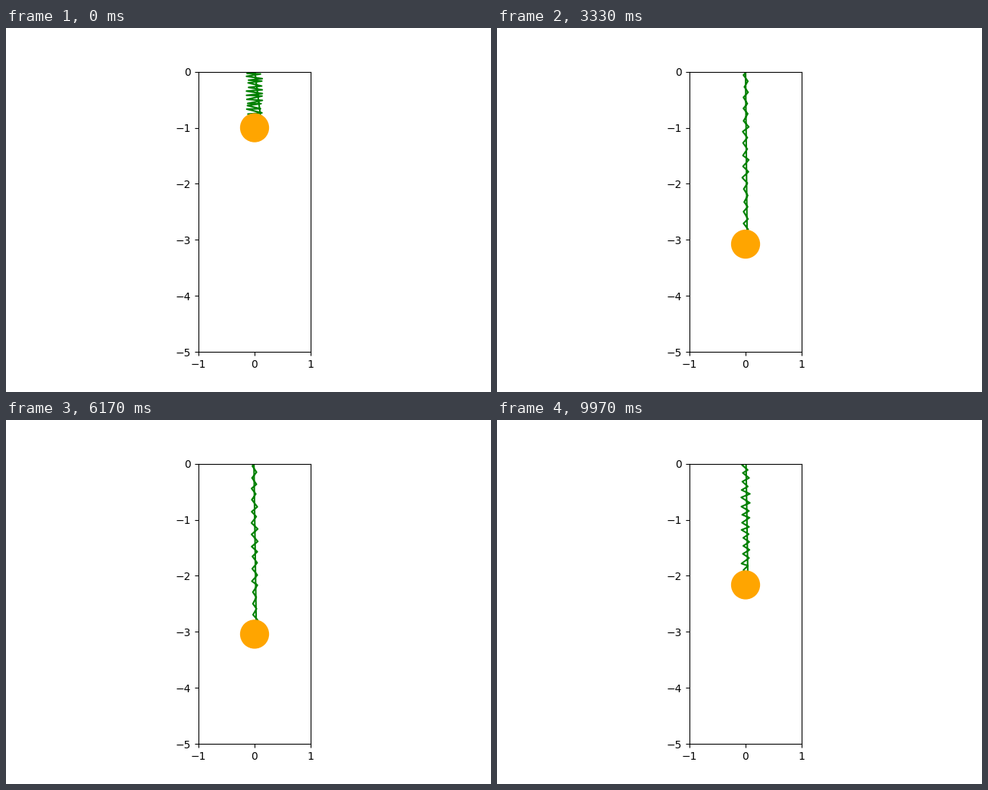
These frames come from a looping animation (640 by 480 pixels, 10000 ms). A matplotlib script:

```python
import numpy as np
import matplotlib.pyplot as plt
from matplotlib.animation import FuncAnimation

FRAMES = 300
LOOP_MS = 10000

# Damped mass on a spring, released at rest
MASS, STIFFNESS, DAMPING = 1.0, 20.0, 0.25
GRAVITY, REST_LENGTH, START_LENGTH = 9.81, 2.0, 1.0

HALF_TURNS = 30
COIL_WIDTH = 0.125
JITTER = 0.02

TIMES = np.linspace(0, 10, FRAMES)


def spring_length(t):
    mean = REST_LENGTH + MASS * GRAVITY / STIFFNESS
    decay = DAMPING / (2 * MASS)
    omega = np.sqrt(STIFFNESS / MASS - decay ** 2)
    swing = np.cos(omega * t) + decay / omega * np.sin(omega * t)
    return mean + (START_LENGTH - mean) * np.exp(-decay * t) * swing


def coil(length, seed):
    """Shaky zigzag from the support down to the ball, closed to its start."""
    rng = np.random.default_rng(seed)
    k = np.arange(HALF_TURNS)
    x = np.append(0, COIL_WIDTH / length * np.where(k % 2, 1, -1))
    y = np.append(0, -length * (k + 0.5) / HALF_TURNS)
    x += rng.uniform(-JITTER, JITTER, x.size)
    y += rng.uniform(-JITTER, JITTER, y.size)
    return np.append(x, x[0]), np.append(y, y[0])


fig, ax = plt.subplots(figsize=(6.4, 4.8), dpi=100)
ax.set_xlim(-1, 1)
ax.set_ylim(-5, 0)
ax.set_aspect("equal")
ax.set_xticks([-1, 0, 1])
ax.set_yticks(range(-5, 1))

spring, = ax.plot([], [], color="green", lw=1.5)
ball = ax.add_patch(plt.Circle((0, -START_LENGTH), 0.25, color="orange", zorder=3))


def update(i):
    length = spring_length(TIMES[i])
    spring.set_data(*coil(length, i))
    ball.center = (0, -length)
    return spring, ball


anim = FuncAnimation(fig, update, frames=FRAMES, interval=LOOP_MS / FRAMES,
                     init_func=lambda: update(0), repeat=True, repeat_delay=0)
plt.show()
```
